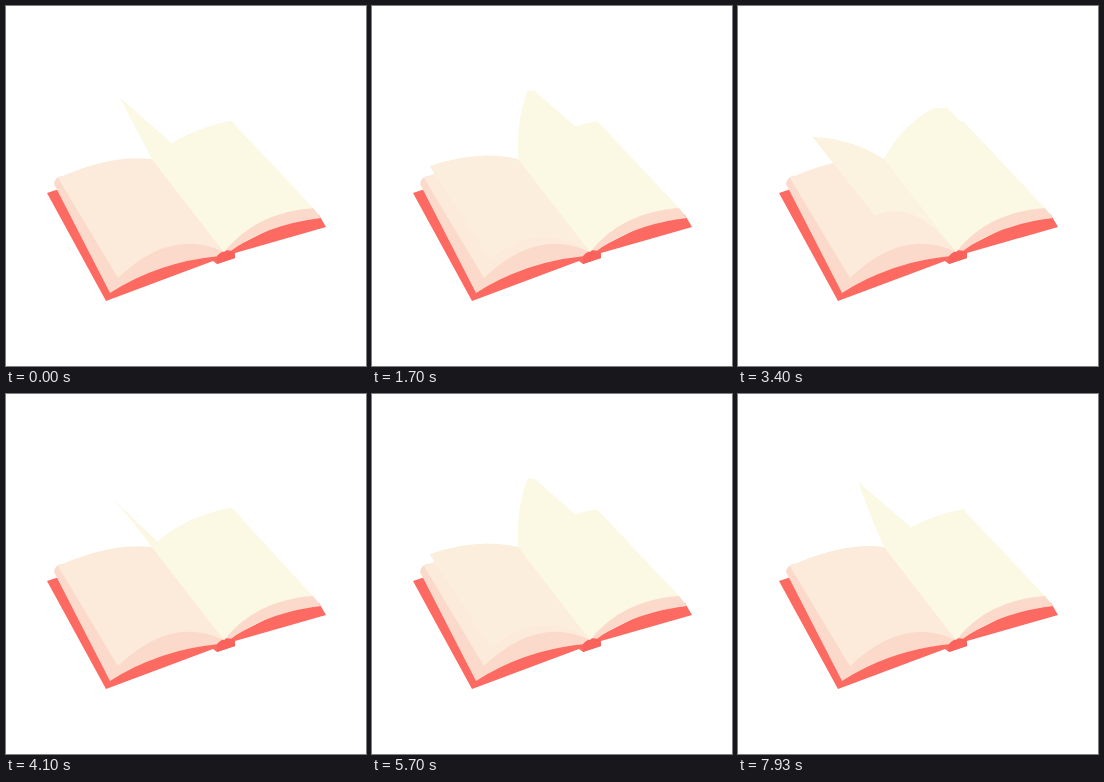
Write an HTML page that moves like this. It is 360 px wide and 360 px high and loops after 8.01 s.

```html
<!DOCTYPE html>
<html>
<head>
<meta charset="utf-8">
<style>
html, body { margin: 0; width: 100%; height: 100%; overflow: hidden; background: #fff; }
svg { display: block; width: 100vw; height: 100vh; }
</style>
</head>
<body>
<svg viewBox="0 0 360 360">
  <path id="cover" fill="#fc6a62" d="M41 187L50 184L146 170L219 246L300 205L313 209L320 221L229 247V252L211 258L207 255L100 295Z"/>
  <g id="stack" fill="#fbdacb">
    <path d="M48 178Q49 171 56 170L146 160L218 246L213 250Q152 256 104 287Z"/>
    <path d="M219 246Q240 205 300 200L307 202L315 212Q258 219 222 247Z"/>
  </g>
  <path id="spine" fill="#fc625c" d="M211 250Q219 241 228 246L229 252L211 258Z"/>
  <path id="left" fill="#fcebdb"/>
  <path id="right" fill="#fbf8e3"/>
  <path id="landing"/>
  <path id="rising" fill="#fbf8e3"/>
</svg>
<script>
const FLIP = 39, EVERY = 20;
const $ = id => document.getElementById(id);

// A point swinging from its right to its left resting place, lifted by h.
function swing([rx, ry], [lx, ly], h, angle) {
  const c = Math.cos(angle), s = Math.sin(angle);
  return [
    (rx + lx) / 2 + (rx - lx) / 2 * c,
    (ry + ly) / 2 + (ry - ly) / 2 * c - h * s * s * (1 - c / 3)
  ];
}

// Outline of a page, u running from 0 (flat right) to 1 (flat left).
function page(u) {
  const angle = Math.PI * (u + 0.08 * Math.sin(Math.PI * u) ** 2);
  const far = swing([225, 115], [52, 172], 60, angle);
  const near = swing([307, 202], [112, 272], 95, angle);
  const topBend = swing([175, 125], [105, 148], 24, angle);
  const lowBend = swing([250, 206], [165, 221], 50, angle);
  topBend[0] -= 4 * Math.sin(angle);
  const blunt = 7 * Math.max(0, Math.sin(2 * angle));
  return `M146 153Q${topBend} ${far[0] - blunt} ${far[1]}L${far[0] + blunt} ${far[1]}`
    + `L${near}Q${lowBend} 218 246Z`;
}

function mix(a, b, k) {
  return `rgb(${a.map((v, i) => v + (b[i] - v) * k)})`;
}

function draw() {
  const t = performance.now() % 8010;
  const step = Math.min(159, Math.floor(t / 100) * 2 + (t % 100 >= 30));
  const s = step % EVERY;
  $("rising").setAttribute("d", page(s / FLIP));
  $("landing").setAttribute("d", page((s + EVERY) / FLIP));
  $("landing").setAttribute("fill", mix([251, 248, 227], [252, 235, 219], s / (EVERY - 1)));
  requestAnimationFrame(draw);
}

$("right").setAttribute("d", page(0));
$("left").setAttribute("d", page(1));
draw();
</script>
</body>
</html>
```
